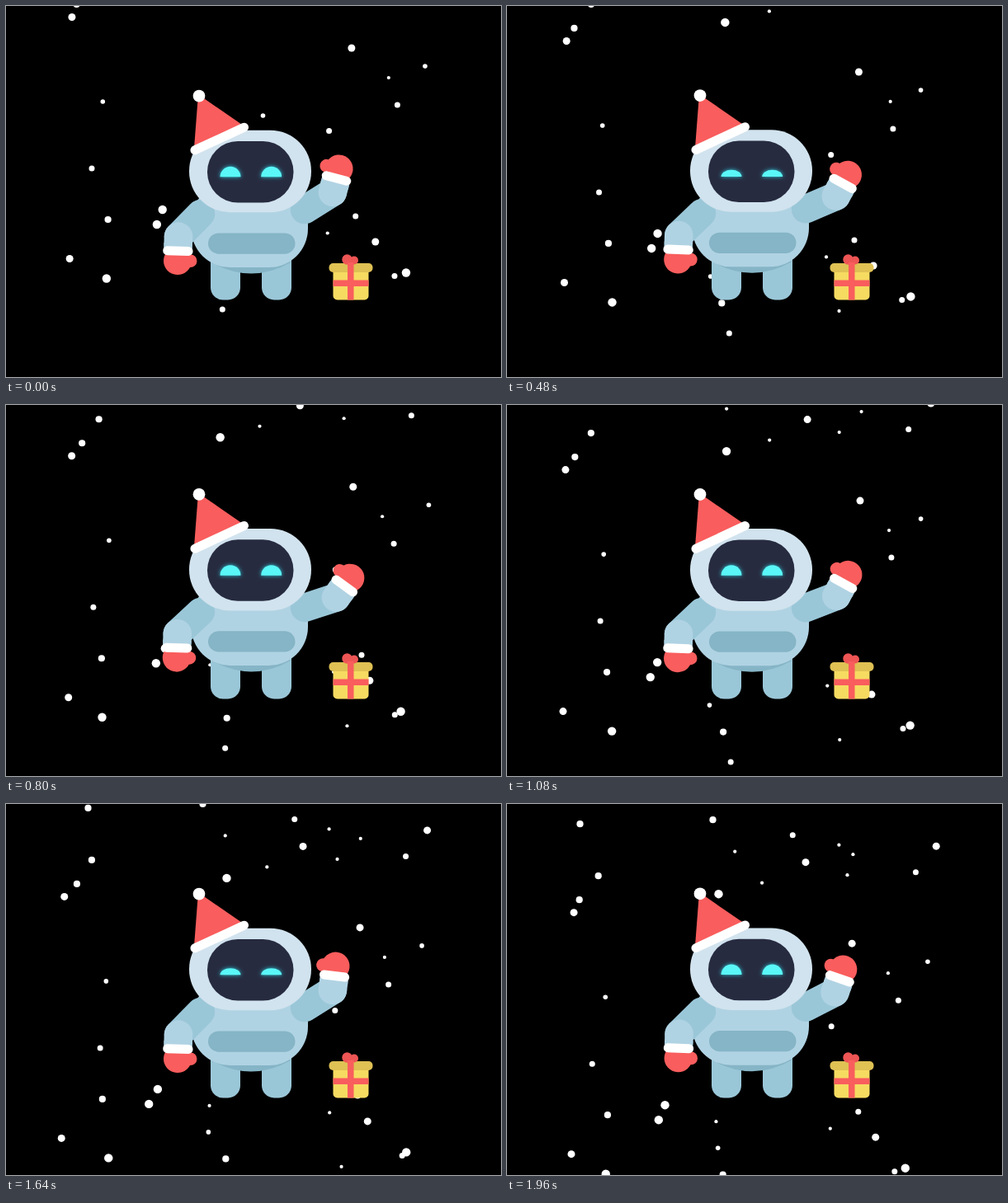
An HTML page that plays this animation: 600 px wide and 450 px high, repeating every 2 s.

```html
<!DOCTYPE html>
<html lang="en">
<head>
<meta charset="utf-8">
<title>Winter robot</title>
<style>
  html, body { margin: 0; width: 100%; height: 100%; overflow: hidden; background: #000; }
  svg { display: block; width: 100%; height: 100%; }
  .light { fill: #b0d3e3; }
  .mid { fill: #9ac7d8; }
  .dark { fill: #85b5c6; }
  .red { fill: #f95d5d; }
  .white { fill: #fff; }
  .limb { stroke-width: 34.5; stroke-linecap: round; }
  .trim { stroke: #fff; stroke-width: 11; stroke-linecap: round; }
  .eye { fill: #5af7f8; }
</style>
</head>
<body>
<svg viewBox="0 0 600 450">
  <defs>
    <filter id="glow" x="-60%" y="-100%" width="220%" height="300%">
      <feDropShadow dx="0" dy="0" stdDeviation="2.6" flood-color="#2fdfee" flood-opacity=".9"/>
    </filter>
    <g id="forearm">
      <path class="limb" stroke="#b0d3e3" d="M0 0V10"/>
      <path class="light" d="M-17.2 8H17.2V18H-17.2Z"/>
      <circle class="red" cx="15.5" cy="29" r="8"/>
      <circle class="red" cy="29.5" r="17"/>
      <path class="trim" d="M-12.7 17.5H12.7"/>
    </g>
  </defs>
  <rect width="600" height="450"/>
  <g id="snow" class="white"></g>

  <g id="gift">
    <rect x="396.5" y="314" width="43" height="42.5" rx="5" fill="#f6db61"/>
    <rect class="red" x="396.5" y="332.5" width="43" height="7.5"/>
    <rect x="391.5" y="312" width="53" height="11" rx="5" fill="#dfc154"/>
    <circle cx="422" cy="308.5" r="5" fill="#ee5555"/>
    <circle cx="413.5" cy="307.5" r="6.2" fill="#ee5555"/>
    <rect class="red" x="414" y="311" width="7.5" height="45.5"/>
  </g>

  <g id="legs" class="mid">
    <rect x="248" y="290" width="36" height="66.5" rx="15"/>
    <rect x="310" y="290" width="36" height="66.5" rx="15"/>
  </g>

  <g id="body">
    <path class="dark" d="M248 310Q297 338 346 310Z"/>
    <rect class="light" x="224.5" y="214" width="141.5" height="102.5" rx="47"/>
    <rect class="dark" x="245" y="274.8" width="105.5" height="25.3" rx="12.6"/>
    <g id="leftArm">
      <path class="limb" stroke="#9ac7d8" d="M0 0L-27 27.5"/>
      <use id="leftForearm" href="#forearm"/>
    </g>
    <g id="rightArm">
      <path class="limb" stroke="#9ac7d8" d="M0 0H40"/>
      <use id="rightForearm" href="#forearm"/>
    </g>
  </g>

  <g id="head">
    <rect x="222" y="150.3" width="148" height="99.6" rx="49.5" fill="#d1e3ee"/>
    <rect x="244" y="163.7" width="104.5" height="74.5" rx="37" fill="#272b40"/>
    <g filter="url(#glow)">
      <path class="eye" d="M-12.5 0A12.5 12.5 0 0 1 12.5 0Z"/>
      <path class="eye" d="M-12.5 0A12.5 12.5 0 0 1 12.5 0Z"/>
    </g>
    <path class="red" d="M233 107L228 172L288 145Z"/>
    <path class="trim" d="M229 174.5L288.5 146.8"/>
    <circle class="white" cx="234" cy="108.7" r="7.4"/>
  </g>
</svg>
<script>
const LOOP = 2000, STEP = 40, TAU = Math.PI * 2;
const BOB_PERIOD = 1640, SWAY_PERIOD = 640, SWAY = 5.5, FALL = 0.0603;
const byId = id => document.getElementById(id);
const place = (el, transform) => el.setAttribute('transform', transform);

// Flakes grouped by radius: [mean x, starting y, sway phase]
const flakeGroups = {
  2.1: [[460.4, 87, -.9], [392, 275.5, 2], [408, 341, 1.7], [250, 267, -.5], [312.7, -22.5, -1.9],
        [407, -32, .5], [271, -60.5, .7], [424.6, -57, -2.4], [397, -68.5, .2]],
  2.8: [[120.3, 116, 2.15], [306, 133, 0], [507, 73, 1.4], [250.5, 299, .75]],
  3.5: [[108.7, 197, -2.6], [267.5, 368, -2.8], [396, 151.5, 2.5], [469, 120, .2], [426, 255, 2],
        [475, 327.5, -2.4], [490, -35.5, .25], [348, -80.5, -1.5]],
  4.1: [[86.8, -2, 1.8], [119.4, 259, -.7], [264, 331.5, 2.4], [107.3, -31, 1.3], [244, -99, .4],
        [94, -94, -2.7]],
  4.5: [[75.9, 13.5, .75], [72.6, 306.5, .6], [423.6, 51, -2.6], [442.5, 286, -.3], [361, -47.5, -1],
        [515.4, -67, -.1]],
  5.2: [[122, 330.5, -1.6], [187.7, 247, 1.2], [178.5, 265, .65], [484, 323.5, -1.4], [262, -9, -2.7]]
};

const flakes = Object.entries(flakeGroups).flatMap(([radius, group]) =>
  group.map(([x, y, phase]) => {
    const el = document.createElementNS('http://www.w3.org/2000/svg', 'circle');
    el.setAttribute('r', radius);
    byId('snow').append(el);
    return { el, x, y, phase };
  }));
const eyes = document.querySelectorAll('.eye');

// Forearm tilt: [time, degrees], eased between the turning points
const waveKeys = [[0, 15], [800, 36], [1640, 7], [2440, 43]];

function waveAngle(t) {
  const i = waveKeys.findIndex(([time]) => time > t);
  const [t0, a0] = waveKeys[i - 1], [t1, a1] = waveKeys[i];
  return a0 + (a1 - a0) * (1 - Math.cos(Math.PI * (t - t0) / (t1 - t0))) / 2;
}

function eyeOpening(t) {
  const distance = Math.min(Math.abs(t - 560), Math.abs(t - 1720));
  return distance < 140 ? 1 - .9 * Math.cos(Math.PI / 2 * distance / 140) ** 2 : 1;
}

function draw(t) {
  for (const { el, x, y, phase } of flakes) {
    el.setAttribute('cx', x + SWAY * Math.cos(TAU * t / SWAY_PERIOD - phase));
    el.setAttribute('cy', y + FALL * t);
  }

  const bob = Math.cos(TAU * t / BOB_PERIOD);
  place(byId('body'), `translate(0 ${.6 * bob})`);
  place(byId('head'), `translate(0 ${.35 * bob})`);

  const drop = 1.3 * (1 - bob);
  place(byId('leftArm'), `translate(236 251.5) rotate(${drop})`);
  place(byId('leftForearm'), `translate(-27 27.5) rotate(${2 - drop})`);

  const lift = 25 + 7 * bob;
  place(byId('rightArm'), `translate(362 246.5) rotate(${-lift})`);
  place(byId('rightForearm'), `translate(40 0) rotate(${180 + lift + waveAngle(t)})`);

  const opening = eyeOpening(t);
  eyes.forEach((eye, i) => place(eye, `translate(${272 + 49.7 * i} 207) scale(1 ${opening})`));
}

let start;
function tick(now) {
  start ??= now;
  draw(Math.floor((now - start) % LOOP / STEP) * STEP);
  requestAnimationFrame(tick);
}
draw(0);
requestAnimationFrame(tick);
</script>
</body>
</html>
```
